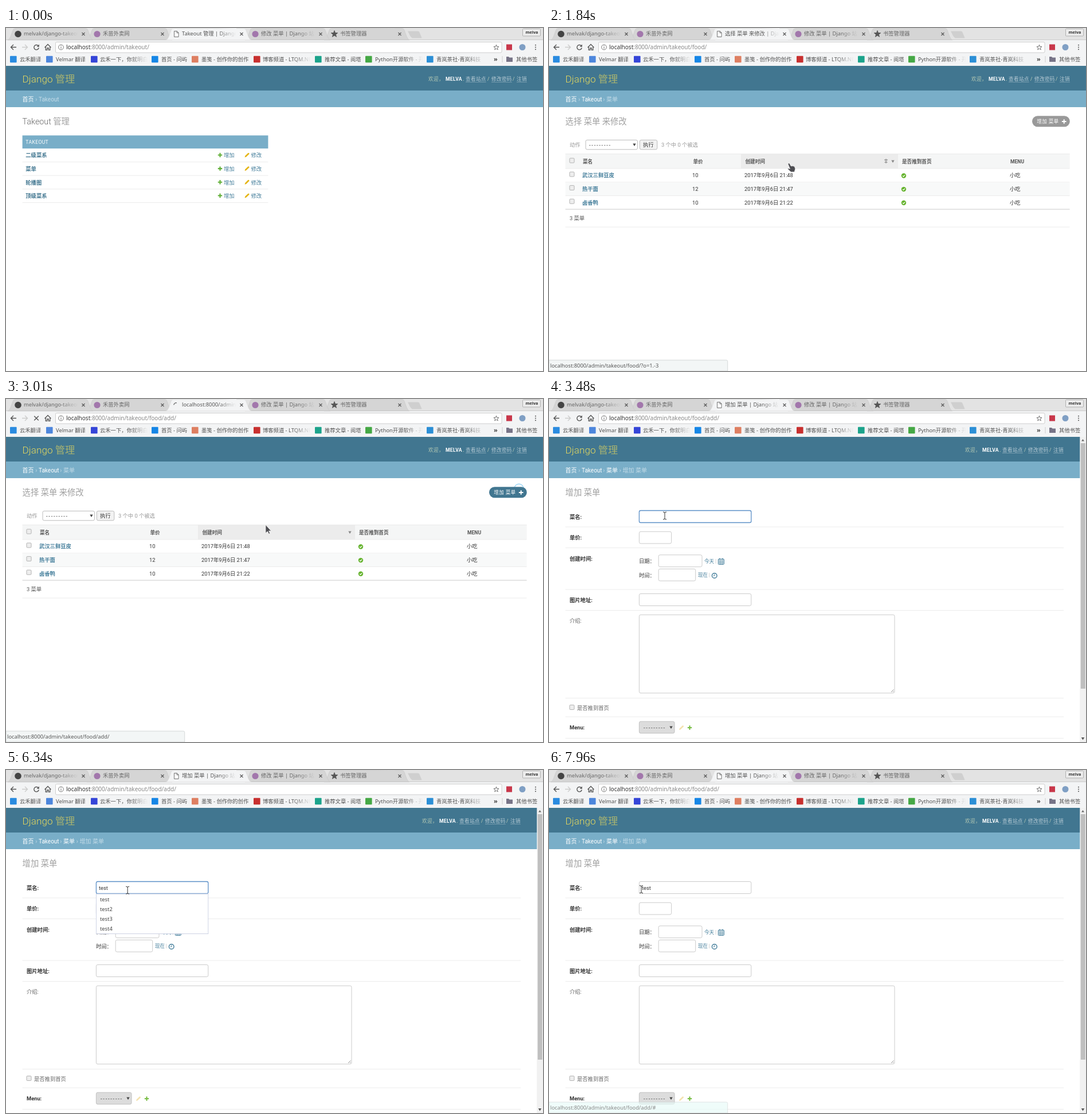
An HTML page that plays this animation: 937x598 px, repeating every 8000 ms.

```html
<!DOCTYPE html>
<html lang="zh-CN">
<head>
<meta charset="utf-8">
<title>Django 管理</title>
<style>
html, body { margin: 0; width: 100%; height: 100%; overflow: hidden; background: #fff; }
svg { display: block; }
text { font-family: Roboto, 'Noto Sans CJK SC', 'Noto Sans CJK', sans-serif; white-space: pre; }
.ui text { font-family: 'Noto Sans', 'Noto Sans CJK SC', 'Noto Sans CJK', sans-serif; }
.b { font-weight: 700; }
.m { font-weight: 500; }
.l { font-weight: 300; }
.s { letter-spacing: .36px; }
.dash { letter-spacing: 1.75px; }
</style>
</head>
<body>
<svg id="stage" width="100%" height="100%" viewBox="0 0 937 598"></svg>
<script>
const LOOP = 8000;
const BAR = '#f3f4f5', TAB = '#d5d5d5', LINK = '#447e9b', PALE = '#c4dce8';

// ---- drawing helpers (text is placed by its left edge and middle line)
const text = (x, y, s, size = 9.3, fill = '#333', more = '') =>
  `<text x="${x}" y="${y + size * .36}" font-size="${size}" fill="${fill}" ${more}>${s}</text>`;
// thin lettering: Chinese has no thin weight here, so it is made paler
const light = (x, y, s, size, fill, cls = 'l') =>
  text(x, y, s.replace(/[\u3000-\uffff]+/g, '<tspan fill-opacity=".62">$&</tspan>'), size, fill, `class="${cls}"`);
const rect = (x, y, w, h, fill, more = '') =>
  `<rect x="${x}" y="${y}" width="${w}" height="${h}" fill="${fill}" ${more}/>`;
const dot = (x, y, r, fill, more = '') => `<circle cx="${x}" cy="${y}" r="${r}" fill="${fill}" ${more}/>`;
const path = (d, fill, more = '') => `<path d="${d}" fill="${fill}" ${more}/>`;
const stroke = (d, color, w = 1, more = '') =>
  path(d, 'none', `stroke="${color}" stroke-width="${w}" ${more}`);
const hline = (x1, x2, y, color = '#eaeaea') => stroke(`M${x1} ${y}H${x2}`, color, .9);
const group = (id, body, more = '') => `<g id="${id}" ${more}>${body}</g>`;
const at = (x, y, body) => `<g transform="translate(${x} ${y})">${body}</g>`;
const clipped = (x, y, w, h, body, fade) =>
  `<svg x="${x}" y="${y}" width="${w}" height="${h}">${body}${fade ? rect(w - 32, 0, 32, h, `url(#${fade})`) : ''}</svg>`;
const fadeDef = (id, c) => `<linearGradient id="${id}"><stop offset="0" stop-color="${c}" stop-opacity="0"/>
  <stop offset="1" stop-color="${c}"/></linearGradient>`;

const cross = (x, y, r, c, w) => stroke(`M${x - r} ${y - r}l${2 * r} ${2 * r}m0 ${-2 * r}l${-2 * r} ${2 * r}`, c, w);
const plus = (x, y, c, r = 3.7, w = 2.1) => stroke(`M${x - r} ${y}h${2 * r}M${x} ${y - r}v${2 * r}`, c, w);
const pencil = (x, y, c = '#e5b515') =>
  at(x, y, path('M-4 4L-3.2 1.2 1.8-3.6Q2.8-4.3 3.8-3.2 4.4-2.3 3.6-1.6L-1.4 3.2Z', c));
const down = (x, y, c = '#444', r = 2.7) => path(`M${x - r} ${y - r * .7}h${2 * r}l${-r} ${r * 1.6}z`, c);
const box = (x, y, w, h, fill = '#fff', c = '#c6c6c6') =>
  rect(x, y, w, h, fill, `rx="2.6" stroke="${c}" stroke-width=".9"`);
const check = (x, y) => rect(x - 4, y - 4, 8, 8, '#eee', 'rx="1.2" stroke="#aaa" stroke-width=".9"');
const tick = (x, y) => dot(x, y, 4.2, '#65b32e') + stroke(`M${x - 2} ${y}l1.5 1.6 2.7-3`, '#fff', 1.2);
const dashes = (x, y) => text(x, y, '---------', 9.3, '#333', 'class="dash"');

// ---- browser frame
const fileIcon = path('M293.5 5.5h5l2.5 2.5v7.5h-7.5zM298 5.5v3h3', '#fff', 'stroke="#666" stroke-width=".9"');
const star = (x, y, r, fill, line) => {
  let d = '';
  for (let i = 0; i < 10; i++) {
    const a = i * Math.PI / 5, q = i % 2 ? r * .42 : r;
    d += `${i ? 'L' : 'M'}${(x + q * Math.sin(a)).toFixed(2)} ${(y - q * Math.cos(a)).toFixed(2)}`;
  }
  return path(d + 'Z', fill, `stroke="${line}" stroke-width=".9"`);
};

function tab(i, icon, title, live) {
  const x = 138 * i;
  const label = live ? '<g id="tabText"></g>' : text(0, 10, title, 9.3, '#666');
  return path(`M${x + 3} 21Q${x + 6} 20 ${x + 8} 15L${x + 12} 4Q${x + 13} .7 ${x + 16} .7H${x + 139}Q${x + 142} .7 ${x + 143} 4L${x + 147} 15Q${x + 149} 20 ${x + 152} 21Z`,
    live ? BAR : TAB, `stroke="${live ? '#d8d8d8' : '#c9c9c9'}" stroke-width=".7"`)
    + icon + clipped(x + 31, 0, 95, 20, label, live ? 'fadeBar' : 'fadeTab')
    + cross(x + 135, 10.5, 2.5, '#555', 1.1);
}

const marks = [
  [7, 24, '云禾翻译', '#2a8be0'], [70, 87, 'Velmar 翻译', '#4d86dc'],
  [148, 164, '云禾一下，你就明白', '#3545d8', 1], [254, 271, '首页 - 问屿', '#1686e6'],
  [324, 341, '墨笺 - 创作你的创作', '#de7f62'], [432, 448, '博客频道 - LTQM.NET', '#c8302f', 1],
  [539, 556, '推荐文章 - 阅塔', '#1ca38b'], [627, 644, 'Python开源软件 - 开放', '#45a845', 1],
  [734, 751, '青岚茶社-青岚科技', '#2c8fd6', 1]
].map(([x, tx, s, c, long]) => rect(x, 48.7, 11.6, 11.6, c, 'rx="1"')
  + clipped(tx, 45, 84, 20, text(0, 9.5, s, 9.3, '#505050'), long ? 'fadeBar' : '')).join('');

const frame = rect(0, 0, 937, 66, BAR) + rect(0, 0, 937, 21, '#e3e3e3')
  + path('M701 5.5h18q2 0 3 3l3.5 9h-17q-2.5-3-3-3z', '#cfcfcf')
  + tab(4, star(573, 10.5, 6, '#555', '#555'), '书签管理器')
  + tab(3, dot(435, 10.5, 5.6, '#a277ac'), '修改 菜单 | Django 站点管理员')
  + tab(1, dot(159, 10.5, 5.6, '#a277ac'), '禾苗外卖网')
  + tab(0, dot(21, 10.5, 5.8, '#444'), 'melvak/django-takeout')
  + hline(0, 937, 20.6, '#c8c8c8')
  + tab(2, group('file', fileIcon) + group('spin', stroke('M0-4.3A4.3 4.3 0 0 1 4.3 0', '#555', 1.3)), '', true)
  + rect(901.5, 1.5, 31, 12.5, '#ececec', 'rx="1" stroke="#aaa" stroke-width=".9"')
  + text(906.5, 7.8, 'melva', 7.2, '#333', 'class="b"')
  + stroke('M18 33.5H9M13 29l-4.5 4.5 4.5 4.5', '#555', 1.4)
  + stroke('M28 33.5h9M33 29l4.5 4.5-4.5 4.5', '#ccc', 1.4)
  + group('reload', stroke('M56.3 31A4.2 4.2 0 1 0 57.2 34.5', '#555', 1.4) + path('M57.8 28.5v4.2h-4.2z', '#555'))
  + group('stop', cross(53, 33.5, 3.8, '#555', 1.4))
  + stroke('M67.5 34L73 28.5l5.5 5.5M69.3 33v5.3h2.5v-3.3h2.5v3.3h2.5v-5.3', '#555', 1.3)
  + rect(86.5, 24.5, 778.5, 18.5, '#fff', 'rx="2" stroke="#c9c9c9" stroke-width=".9"')
  + dot(96, 33.5, 4.4, 'none', 'stroke="#777"') + stroke('M96 33v3M96 30.8v1.2', '#777', 1.1)
  + '<g id="url"></g>' + star(855.5, 34, 4.8, '#fff', '#666')
  + rect(873, 28.5, 10, 10, '#c8374a') + dot(901, 33.5, 5.5, '#7f9fc4')
  + [29.8, 33.5, 37.2].map(y => dot(924, y, 1, '#555')).join('')
  + marks + text(851, 54, '»', 11, '#444', 'class="b"') + stroke('M866 49v11', '#ccc')
  + path('M873 50h4l1.5 1.5h5.5v7.5h-11z', '#777487') + text(890, 54.5, '其他书签', 9.3, '#505050');

// ---- site header and the three pages
const tool = (x, s) => light(x, 88.5, s, 8.58, '#fff', 'l s')
  + hline(x, x + s.length * 8.94, 94.5, 'rgba(255,255,255,.3)');
const header = rect(0, 66, 937, 43, '#417690') + rect(0, 109, 937, 29, '#79aec8')
  + light(28.6, 88.5, 'Django 管理', 17.16, '#e6d95e')
  + group('tools', light(737, 88.5, '欢迎，', 8.58, '#ffc', 'l s')
    + text(767, 88.5, 'MELVA', 8.58, '#fff', 'class="b s"') + text(797, 88.5, '.', 8.58, '#ffc')
    + tool(802, '查看站点') + light(840, 88.5, '/', 8.58, '#ffc') + tool(847, '修改密码')
    + light(884, 88.5, '/', 8.58, '#ffc') + tool(891, '注销'));

const crumbs = names => names.map(([x, s], i) =>
  text(x, 124.5, s, 10, i < names.length - 1 ? '#fff' : PALE)
  + (i ? text(x - 5.8, 124.5, '›', 10, PALE) : '')).join('');
const title = s => light(28.6, 163, s, 14.3, '#666');

const home = crumbs([[28.6, '首页'], [57, 'Takeout']]) + title('Takeout 管理')
  + rect(28.6, 187.3, 428.8, 22.8, '#79aec8') + text(34.3, 199, 'TAKEOUT', 8.58, '#fff', 'class="s"')
  + ['二级菜系', '菜单', '轮播图', '顶级菜系'].map((s, i) => {
    const y = 222 + 23.6 * i;
    return text(34.3, y, s, 9.3, '#417690', `class="b" id="item${i}"`) + plus(373.5, y - .5, '#5fae35')
      + text(380, y, '增加', 9.3, LINK) + pencil(420.5, y - .5) + text(427.5, y, '修改', 9.3, LINK)
      + hline(28.6, 457.4, y + 11.6);
  }).join('');

const head = (x, s) => text(x, 232.5, s, 8.58, '#555', 'class="b"');
const list = crumbs([[28.6, '首页'], [57, 'Takeout'], [100, '菜单']]) + title('选择 菜单 来修改')
  + text(36, 203.5, '动作', 9.3, '#999') + box(64, 195.3, 90.5, 16.5, '#fff', '#b5b5b5')
  + dashes(70, 204) + down(149, 203.5)
  + box(158.3, 195.3, 30.5, 16.5, '#f2f2f2', '#b5b5b5') + text(164, 204, '执行')
  + text(196, 203.5, '3 个中 0 个被选', 9.3, '#999')
  + rect(28.6, 219.5, 880, 25.5, '#f5f6f6') + rect(335, 219.5, 274, 25.5, '#ececec')
  + hline(28.6, 908.6, 219.5) + hline(28.6, 908.6, 245)
  + check(40, 231) + head(59, '菜名') + head(251.5, '单价') + head(342.5, '创建时间')
  + head(616, '是否推到首页') + head(805, 'MENU') + down(600, 232.5, '#888')
  + group('sort', stroke('M588 228v8M585 230h6M585.5 234h5', '#999', 1.4))
  + [['武汉三鲜豆皮', 10, 48], ['热干面', 12, 47], ['卤香鸭', 10, 22]].map(([s, price, min], i) => {
    const y = 257 + 23.6 * i;
    return (i == 1 ? rect(28.6, y - 11.8, 880, 23.6, '#f8f9f9') : '') + check(40, y - 2)
      + text(58, y, s, 9.3, LINK, 'class="b"') + text(250, y, price)
      + text(341, y, `2017年9月6日 21:${min}`) + tick(619, y + .5) + text(804, y, '小吃')
      + hline(28.6, 908.6, y + 11.8, i == 2 ? '#c4c4c4' : '#eaeaea');
  }).join('')
  + text(36, 332, '3 菜单', 9.3, '#555') + hline(28.6, 908.6, 347);

const addButton = group('pill', rect(843, 153.3, 65.8, 19, '#999', 'rx="9.5" id="pillBg"')
  + text(851.3, 163, '增加 菜单', 8.58, '#fff', 'class="s"') + plus(898.7, 163, '#fff', 3.8, 2));

const label = (y, s) => text(36, y, s, 9.3, '#333', 'class="b"');
const form = crumbs([[28.6, '首页'], [57, 'Takeout'], [100, '菜单'], [128.5, '增加 菜单']]) + title('增加 菜单')
  + [223, 259.5, 332, 368.5, 521.5, 554, 591.5].map(y => hline(28.6, 898, y)).join('')
  + label(205.5, '菜名:') + label(242, '单价:') + label(278.5, '创建时间:') + label(350.5, '图片地址:')
  + text(36, 387, '介绍:', 9.3, '#666') + label(573, 'Menu:')
  + group('field', box(157.4, 194.5, 195.4, 21)) + '<g id="typed"></g>' + stroke('M0 199.5v11', '#333', .9, 'id="caret"')
  + box(157.4, 231.2, 56.2, 20.8) + box(191.2, 271.8, 75.8, 20.8) + box(191.2, 296.3, 64.5, 20.8)
  + text(157, 283, '日期：', 9.3, '#333', 'class="m"') + text(157, 307.5, '时间：', 9.3, '#333', 'class="m"')
  + text(271, 282.5, '今天', 8.58, LINK, 'id="today"') + text(290, 282.5, '|', 8.58, '#bbb')
  + text(260, 307, '现在', 8.58, LINK) + text(278.7, 307, '|', 8.58, '#bbb')
  + rect(295.3, 279, 10, 9.5, '#fff', `stroke="${LINK}" rx="1"`)
  + stroke('M295.5 281h10M295.5 283.8h10M295.5 286.2h10M298.5 281v7.5M302 281v7.5', LINK, .8)
  + stroke('M297.8 277.5v2M302.8 277.5v2', LINK, 1.3)
  + dot(288.7, 308, 4.3, '#fff', `stroke="${LINK}" stroke-width="1.4"`) + stroke('M288.7 305.5v2.7h-2', LINK, 1)
  + box(157.4, 339.5, 195.4, 21) + box(157.4, 376.2, 445.6, 136.5)
  + stroke('M597 511l4.5-4.5M600 511l1.5-1.5', '#777', .8)
  + check(40, 537.5) + text(49, 538.5, '是否推到首页', 9.3, '#666')
  + box(157.4, 562.2, 61.6, 20.5, '#dcdcdc', '#bbb') + dashes(165, 573)
  + down(213, 572.5) + pencil(231, 573, '#f4e2b0') + plus(245.5, 573, '#79bd45')
  + rect(926.3, 66, 11, 532, '#f1f1f1') + rect(927.8, 77, 8, 428, '#bfbfbf')
  + path('M929 73.5h5l-2.5-3.5z', '#666') + down(931.5, 592, '#555');

const popup = group('popup', rect(157.4, 216, 195.4, 69.5, '#fff', 'stroke="#c8cee2" stroke-width=".9"')
  + rect(158, 217, 194.5, 17, '#e4e8f0', 'id="pick"')
  + ['test', 'test2', 'test3', 'test4'].map((s, i) =>
    text(164, 225.3 + 17.1 * i, s, 9.3, '#444', 'class="m"')).join(''), 'class="ui"');

const status = group('status', path('M0 579H309.5Q311.7 579 311.7 581.5V598H0Z', '#f3f6f6',
  'stroke="#d0d4d4" stroke-width=".9" id="bubble"') + '<g id="statusText"></g>', 'class="ui"');
const edge = 'stroke="#fff" stroke-width=".6"';
const pointer = group('cursor',
  group('arrow', path('M0 0V14.3L3.3 11.3 5.7 15.8 7.7 14.8 5.5 10.4H9.6Z', '#4d4d52', edge))
  + group('hand', path('M0 1.5Q1-.8 2.7.8L5.2 5.3Q9 4.4 11.5 6.2L12.7 10 11.2 15.5H5.2L1 11.7Q-1 9.8.4 9.2L3.5 10Z', '#4d4d52', edge))
  + group('beam', stroke('M-3-6.5Q0-6.5 0-5Q0-6.5 3-6.5M0-5.5V5.5M-3 6.5Q0 6.5 0 5Q0 6.5 3 6.5', '#333', 1)));

document.getElementById('stage').innerHTML = `<defs>${fadeDef('fadeTab', TAB)}${fadeDef('fadeBar', BAR)}</defs>`
  + rect(0, 0, 937, 598, '#fff') + header + group('home', home) + group('list', list) + group('form', form)
  + group('frame', frame, 'class="ui"') + popup + dot(0, 0, 1, 'none', 'id="ring" stroke="#86cdf3"')
  + addButton + status + pointer;

// ---- timeline
const food = '/admin/takeout/food/';
const pages = [[0, 'home'], [1420, 'list'], [3210, 'form']];
const urls = [[0, '/admin/takeout/'], [1060, food], [2860, food + 'add/']];
const site = ' | Django 站点管理员';
const titles = [[0, 'Takeout 管理' + site], [1110, '选择 菜单 来修改' + site],
  [2900, 'localhost:8000/admin/takeout/food/add/'], [3260, '增加 菜单' + site]];
const hints = [[0, food], [1790, food + '?o=1.-3'], [2250, food + 'add/'], [6900, food + 'add/#']];
const hintAlpha = [[910, 0], [1010, 1], [2080, 1], [2180, 0], [2350, 0], [2450, 1], [3210, 1], [3400, 0],
  [7000, 0], [7100, 1], [7900, 1], [8000, .5]];
const shapes = [[0, ''], [680, 'hand'], [1440, 'arrow'], [1790, 'hand'], [1960, 'arrow'], [2350, 'hand'],
  [2880, 'arrow'], [3380, 'beam'], [6350, 'arrow'], [6950, 'hand'], [7630, 'arrow'], [7800, 'beam']];
const track = [[1440, 41, 247], [1840, 417, 235.5], [2450, 893, 156], [2850, 893, 156], [3010, 453, 219.5],
  [3210, 453, 219.5], [3450, 202, 203.5], [6300, 202, 203.5], [6570, 365, 301], [6720, 365, 301],
  [6830, 293, 287], [7000, 277, 281], [7590, 275, 281], [7930, 161, 208]];
const words = [[0, ''], [4630, 'te'], [5170, 'tes'], [5380, 'test']];
const caretX = { te: 170.8, tes: 175.6, test: 178.6 };
// start, x, y, age at which the ring freezes, life
const clicks = [[930, 44, 249, 300, 300], [2800, 895, 156, 210, 410],
  [3670, 202.5, 203.5, 300, 300], [6720, 365, 301, 300, 300]];

const $ = id => document.getElementById(id);
const during = (t, a, b) => t >= a && t < b;
const step = (table, t) => table.filter(r => r[0] <= t).pop()[1];
const smooth = p => p * p * (3 - 2 * p);
const show = (id, on) => { $(id).style.display = on ? '' : 'none'; };

function tween(keys, t, ease = p => p) {
  const n = keys.findIndex(k => k[0] > t);
  if (n < 1) return keys[n ? keys.length - 1 : 0].slice(1);
  const a = keys[n - 1], b = keys[n], p = ease((t - a[0]) / (b[0] - a[0]));
  return a.slice(1).map((v, i) => v + (b[i + 1] - v) * p);
}

const cache = {};
function fill(id, html) {
  if (cache[id] !== html) $(id).innerHTML = cache[id] = html;
}

function drawRing(t) {
  const ring = $('ring');
  const hit = clicks.find(c => during(t, c[0], c[0] + c[4]));
  show('ring', hit);
  if (!hit) return;
  const p = Math.min(t - hit[0], hit[3]) / 300;
  const outer = 9.5 * p ** .3, inner = outer * Math.min(.96, 1.1 * smooth(p));
  ring.setAttribute('cx', hit[1]);
  ring.setAttribute('cy', hit[2]);
  ring.setAttribute('r', (outer + inner) / 2);
  ring.setAttribute('stroke-width', outer - inner);
}

function draw(t) {
  const page = step(pages, t);
  pages.forEach(p => show(p[1], p[1] == page));
  $('tools').setAttribute('transform', `translate(${page == 'form' ? -11 : 0} 0)`);
  fill('url', `<text x="105" y="37.2" font-size="10" fill="#888"><tspan fill="#333">localhost</tspan>:8000${step(urls, t)}</text>`);
  fill('tabText', text(0, 10, step(titles, t), 9.3, '#555'));

  const busy = during(t, 1060, 1650) || during(t, 2860, 3440);
  show('stop', busy);
  show('reload', !busy);
  show('spin', busy);
  show('file', !busy);
  const turn = t < 2000 ? (t - 1270) * .3 : -80 - (t < 3210 ? Math.min(t - 3010, 0) : t - 3210) * .3;
  $('spin').setAttribute('transform', `translate(297 11) rotate(${turn})`);

  $('item1').setAttribute('fill', t >= 680 ? '#234' : '#417690');
  show('sort', during(t, 1740, 2050));
  show('pill', page == 'list');
  $('pillBg').setAttribute('fill', t >= 2350 ? '#417690' : '#999');
  $('today').setAttribute('fill', during(t, 6950, 7630) ? '#036' : LINK);

  const typed = step(words, t);
  fill('typed', text(162, 205.5, typed));
  show('caret', during(t, 4630, 5980));
  $('caret').setAttribute('transform', `translate(${caretX[typed] || 162} 0)`);
  const edit = $('field').firstChild, focused = t < 6720;
  edit.setAttribute('stroke', focused ? '#5b8fc7' : '#c6c6c6');
  edit.setAttribute('stroke-width', focused ? 1.3 : .9);

  const [x, y] = tween(track, t, smooth);
  const out = Math.max(0, (t - 6720) / 140);
  show('popup', t >= 4630 && out < 1);
  $('popup').style.opacity = 1 - out;
  $('popup').setAttribute('transform', `translate(255 250.5) scale(${1 - .042 * out}) translate(-255 -250.5)`);
  const row = Math.floor((y - 217) / 17.1);
  show('pick', during(t, 6300, 6570) && row >= 0 && row < 4);
  $('pick').setAttribute('y', 217 + 17.1 * row);

  const alpha = tween(hintAlpha, t)[0];
  show('status', alpha > 0);
  $('status').style.opacity = alpha;
  $('bubble').setAttribute('fill', t > 7900 ? '#e8fbf8' : '#f3f6f6');
  fill('statusText', text(2, 589, 'localhost:8000' + step(hints, t), 9.3, '#555'));

  drawRing(t);
  const shape = step(shapes, t);
  ['arrow', 'hand', 'beam'].forEach(s => show(s, s == shape));
  $('cursor').setAttribute('transform', `translate(${x} ${y})`);
}

const start = performance.now();
(function tick() {
  draw((performance.now() - start) % LOOP);
  requestAnimationFrame(tick);
})();
</script>
</body>
</html>
```
